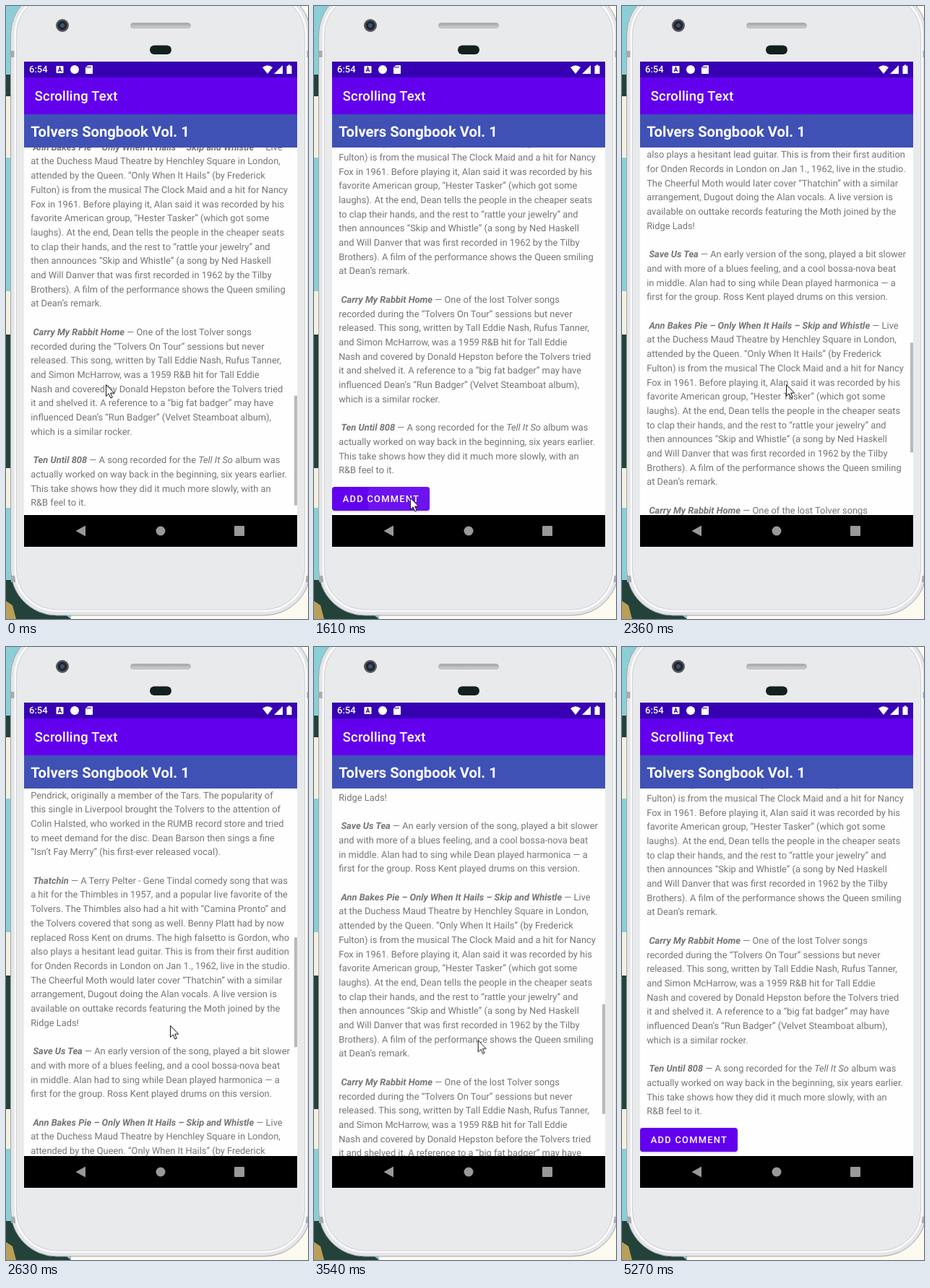
An HTML page that plays this animation: 418x849 px, repeating every 5.83 s.

```html
<!DOCTYPE html>
<html lang="en">
<head>
<meta charset="utf-8">
<title>Scrolling Text</title>
<style>
  html, body { margin: 0; width: 100%; height: 100%; overflow: hidden; background: #fdfbf0; }
  body { position: relative; font-family: Roboto, sans-serif; text-rendering: geometricPrecision; }
  svg { position: absolute; left: 0; top: 0; display: block; }
  .screen div { position: absolute; }
  .screen > div { left: 25px; width: 378px; }
  .status { top: 77px; height: 22px; background: #3700b3; }
  .appbar { top: 99px; height: 51px; background: #6200ee; }
  .heading { top: 150px; height: 46px; background: #3f51b5; }
  .nav { top: 705px; height: 44px; background: #000; }
  .view { top: 196px; height: 509px; background: #fefefe; overflow: hidden; }
  .label { white-space: pre; color: #fff; }
  .status .label { left: 7px; font: 500 13px/23px Roboto, sans-serif; }
  .appbar .label { left: 14.7px; font: 500 18.4px/53px Roboto, sans-serif; letter-spacing: .0125em; }
  .heading .label { left: 9.2px; font: 700 20.2px/48px Roboto, sans-serif; }
  #content { inset: 0; }
  .text {
    left: 9.2px; bottom: 51px; white-space: pre;
    font-size: 12.86px; line-height: 19.7px; color: #757575;
  }
  .text b { font-style: italic; }
  .button {
    left: 0; top: 470px; width: 135px; height: 33px; border-radius: 3.7px;
    background: #6200ee; box-shadow: 0 1px 3px rgba(0, 0, 0, .25);
  }
  .clip { inset: 0; border-radius: inherit; overflow: hidden; }
  .button .label { left: 14.8px; font: 500 12.86px/35px Roboto, sans-serif; letter-spacing: .098em; }
  #bar { right: 0; top: 357px; width: 4px; height: 152px; background: #b9b9b9; }
  .ripple { left: 0; top: 17px; width: 2px; height: 2px; margin: -1px; border-radius: 50%; background: #fff; }

  /* Paused: the script steps these along with the scroll. */
  .ripple, #bar, #cursor { animation: 5830ms linear infinite paused; }
  .ripple { animation-name: press; }
  #bar { animation-name: fade; }
  #cursor { animation-name: point; }

  @keyframes press {
    0%, 27% { opacity: 0; transform: translateX(108px) scale(60); }
    27.1% { opacity: .08; transform: translateX(108px) scale(60); }
    31%, 69% { opacity: 0; transform: translateX(108px) scale(20); }
    73.6% { opacity: .24; transform: translateX(60px) scale(67); }
    78%, 100% { opacity: 0; transform: translateX(60px) scale(100); }
  }
  @keyframes fade {
    0%, 17%, 31%, 67% { opacity: 1; }
    23%, 30.9%, 74.5%, 100% { opacity: 0; }
  }
  @keyframes point {
    0%, 10.5% { transform: translate(138px, 524px); }
    13.9% { transform: translate(87px, 771px); }
    16.1% { transform: translate(129px, 674px); }
    27.4% { transform: translate(133px, 681px); }
    36%, 50% { transform: translate(227px, 524px); }
    56% { transform: translate(228px, 535px); }
    62.6% { transform: translate(226px, 549px); }
    67%, 71.4% { transform: translate(128px, 682px); }
    73.6% { transform: translate(258px, 602px); }
    78% { transform: translate(331px, 707px); }
    86% { transform: translate(309px, 700px); }
    89%, 100% { transform: translate(315px, 900px); }
  }
</style>
</head>
<body>
<svg width="418" height="849" viewBox="0 0 418 849">
  <defs>
    <linearGradient id="slot" x2="0" y2="1">
      <stop offset="0" stop-color="#9fa1a3"/>
      <stop offset="1" stop-color="#d2d3d4"/>
    </linearGradient>
  </defs>

  <rect width="90" height="849" fill="#8acfd6"/>
  <path d="M0 125h8v85H0zM0 395h8v60H0zM0 640h8v55H0z" fill="#f4f1df"/>
  <path d="M0 95h8v30H0zM0 455h8v185H0zM0 795h20l70 54H0z" fill="#23423a"/>
  <path d="M0 824l9 6 5 19H0z" fill="#b99f58"/>

  <rect x="6.500" y="-24" width="415" height="868" rx="64" fill="#e4e5e8" stroke="#a3a5a9"/>
  <g fill="#a9abae">
    <rect x="7" y="62" width="6" height="9"/>
    <rect x="7" y="789" width="6" height="9"/>
    <rect x="415" y="62" width="3" height="9"/>
    <rect x="415" y="789" width="3" height="9"/>
  </g>
  <rect x="13" y="-17.500" width="402" height="855" rx="57" fill="#e9eaec" stroke="#fafafa" stroke-width="3"/>
  <rect x="14.500" y="-16" width="399" height="852" rx="56" fill="none" stroke="#cfd0d3"/>

  <circle cx="78" cy="27" r="9" fill="#55585c"/>
  <circle cx="78" cy="27" r="6.500" fill="#22262c"/>
  <circle cx="78" cy="27" r="3" fill="#3c5276"/>
  <rect x="172.500" y="23.500" width="83" height="7" rx="3.500" fill="url(#slot)" stroke="#b4b6b8"/>
  <rect x="199" y="54.500" width="30" height="12.500" rx="6.250" fill="#12201f"/>
</svg>

<div class="screen">
  <div class="status"><div class="label">6:54</div></div>
  <div class="appbar"><div class="label">Scrolling Text</div></div>
  <div class="view">
    <div id="content">
      <div class="text">Pendrick, originally a member of the Tars. The popularity of
this single in Liverpool brought the Tolvers to the attention of
Colin Halsted, who worked in the RUMB record store and tried
to meet demand for the disc. Dean Barson then sings a fine
“Isn’t Fay Merry” (his first-ever released vocal).

 <b>Thatchin</b> — A Terry Pelter - Gene Tindal comedy song that was
a hit for the Thimbles in 1957, and a popular live favorite of the
Tolvers. The Thimbles also had a hit with “Camina Pronto” and
the Tolvers covered that song as well. Benny Platt had by now
replaced Ross Kent on drums. The high falsetto is Gordon, who
also plays a hesitant lead guitar. This is from their first audition
for Onden Records in London on Jan 1., 1962, live in the studio.
The Cheerful Moth would later cover “Thatchin” with a similar
arrangement, Dugout doing the Alan vocals. A live version is
available on outtake records featuring the Moth joined by the
Ridge Lads!

 <b>Save Us Tea</b> — An early version of the song, played a bit slower
and with more of a blues feeling, and a cool bossa-nova beat
in middle. Alan had to sing while Dean played harmonica — a
first for the group. Ross Kent played drums on this version.

 <b>Ann Bakes Pie – Only When It Hails – Skip and Whistle</b> — Live
at the Duchess Maud Theatre by Henchley Square in London,
attended by the Queen. “Only When It Hails” (by Frederick
Fulton) is from the musical The Clock Maid and a hit for Nancy
Fox in 1961. Before playing it, Alan said it was recorded by his
favorite American group, “Hester Tasker” (which got some
laughs). At the end, Dean tells the people in the cheaper seats
to clap their hands, and the rest to “rattle your jewelry” and
then announces “Skip and Whistle” (a song by Ned Haskell
and Will Danver that was first recorded in 1962 by the Tilby
Brothers). A film of the performance shows the Queen smiling
at Dean’s remark.

 <b>Carry My Rabbit Home</b> — One of the lost Tolver songs
recorded during the “Tolvers On Tour” sessions but never
released. This song, written by Tall Eddie Nash, Rufus Tanner,
and Simon McHarrow, was a 1959 R&amp;B hit for Tall Eddie
Nash and covered by Donald Hepston before the Tolvers tried
it and shelved it. A reference to a “big fat badger” may have
influenced Dean’s “Run Badger” (Velvet Steamboat album),
which is a similar rocker.

 <b>Ten Until 808</b> — A song recorded for the <i>Tell It So</i> album was
actually worked on way back in the beginning, six years earlier.
This take shows how they did it much more slowly, with an
R&amp;B feel to it.</div>
      <div class="button">
        <div class="clip"><div class="ripple"></div></div>
        <div class="label">ADD COMMENT</div>
      </div>
    </div>
    <div id="bar"></div>
  </div>
  <div class="heading"><div class="label">Tolvers Songbook Vol. 1</div></div>
  <div class="nav"></div>
</div>

<svg width="418" height="849" viewBox="0 0 418 849">
  <g fill="#fff">
    <rect x="69.500" y="83" width="10" height="10" rx="1"/>
    <circle cx="95" cy="88" r="6"/>
    <path d="M113.500 82h5.500q1 0 1 1v10q0 1-1 1h-8q-1 0-1-1v-7.500z"/>
    <path d="M355 85q7-5.500 14 0l-7 9z"/>
    <path d="M383 82v12h-12z"/>
    <path d="M390.500 81.500h3v1.500h2v11h-7v-11h2z"/>
  </g>
  <path d="M72.300 91l2.200-6 2.200 6M73 89.300h3" fill="none" stroke="#3700b3" stroke-width="1.200"/>
  <path d="M112.500 86v-2M114.500 86v-2.500M116.500 86v-2.500" stroke="#3700b3"/>
  <g fill="#999">
    <path d="M96.500 727l13.500-7.500v15z"/>
    <circle cx="214" cy="727" r="6.500"/>
    <rect x="316" y="720" width="14" height="14" rx="1"/>
  </g>
  <path id="cursor" d="M.5.5v16l3.700-3.500 2.700 6 2.400-1-2.600-5.900h5z" fill="#fff" stroke="#111"/>
</svg>

<script>
const LOOP = 5830;
const STEP = 129, PHASE = 37;
const START = 45, TOP = 508;  // distances from the end of the text
const BAR_RATIO = 0.297;

const content = document.getElementById("content");
const bar = document.getElementById("bar");
const animations = document.getAnimations();

// Accelerates from 0 to 1 between two times.
const speedUp = (t, from, to) =>
  Math.min(1, Math.max(0, (t - from) / (to - from))) ** 1.64;

function scrollAt(t) {
  if (t < 270) return START;
  return Math.round(TOP * (speedUp(t, 1716, 2617) - speedUp(t, 3146, 3649)));
}

function draw(time) {
  const t = Math.max(0, Math.floor((time - PHASE) / STEP) * STEP + PHASE);
  const offset = scrollAt(t);
  content.style.transform = `translateY(${offset}px)`;
  bar.style.transform = `translateY(${-offset * BAR_RATIO}px)`;
  for (const animation of animations) animation.currentTime = t;
}

const begin = performance.now();
function tick() {
  draw((performance.now() - begin) % LOOP);
  requestAnimationFrame(tick);
}
tick();
</script>
</body>
</html>
```
